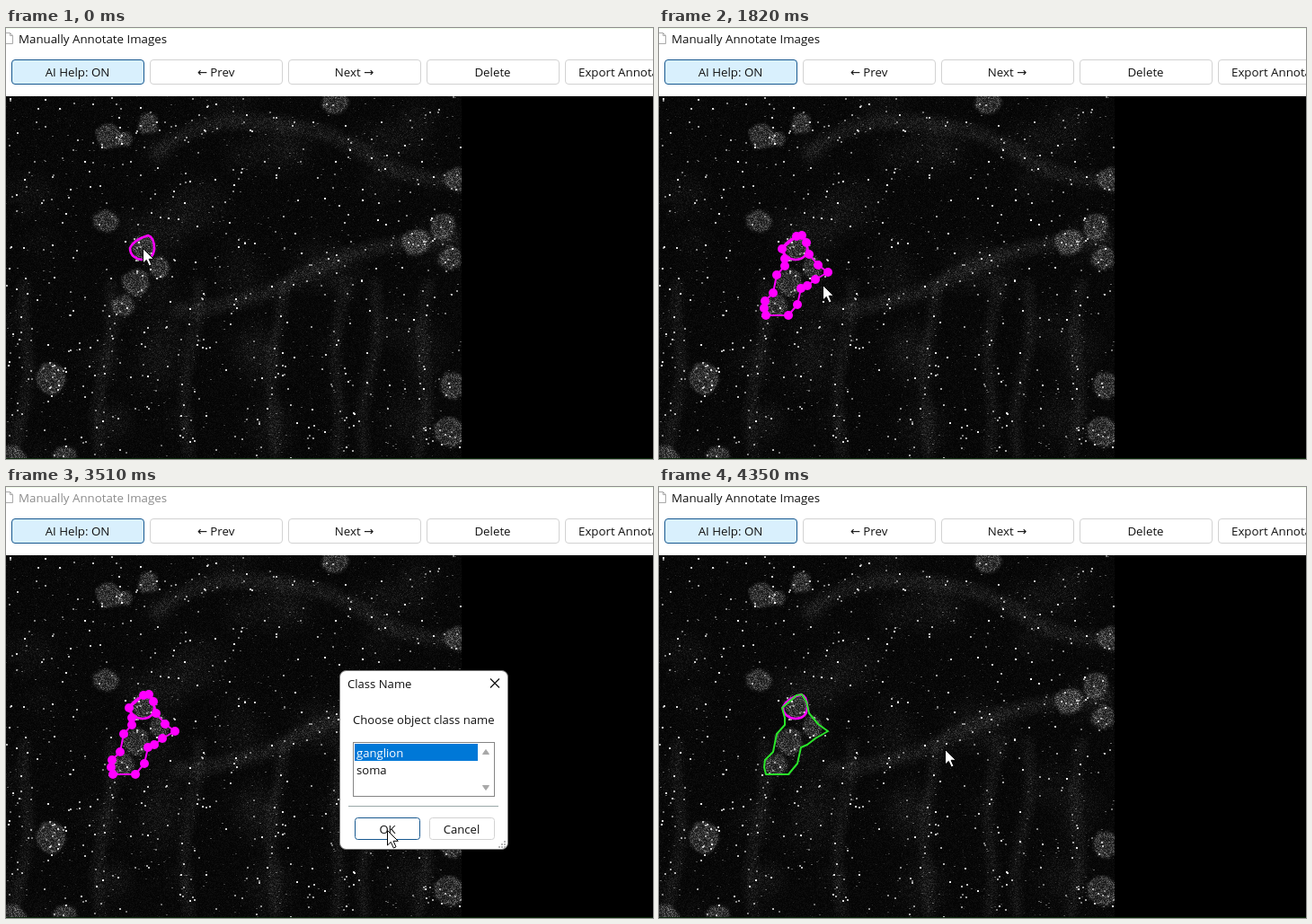
An HTML page with a canvas that plays this animation: 720 by 480 pixels, repeating every 4.75 s.

```html
<!DOCTYPE html>
<html lang="en">
<head>
<meta charset="utf-8">
<title>Manually Annotate Images</title>
<style>
  html, body { margin: 0; width: 100%; height: 100%; overflow: hidden; background: #000; }
  canvas { position: absolute; left: 0; top: 76px; }
  svg { position: absolute; left: 0; top: 0; }
  text { font: 13.3px "Open Sans", "Noto Sans", "DejaVu Sans", sans-serif; fill: #111; }
  .mid { text-anchor: middle; }
  .btn { fill: #fff; stroke: #d2d2d2; }
  .on { fill: #d9f0fd; stroke: #17588f; }
  .main { stroke: #17588f; }
  .small text { font-size: 13.1px; }
  .line { fill: none; stroke: #f0f; stroke-width: 2; stroke-linejoin: round; }
</style>
</head>
<body>
<canvas id="scan" width="507" height="404"></canvas>
<svg width="720" height="480" viewBox="0 0 720 480">
  <path fill="#fff" d="M0 0H720V76H0z"/>
  <path fill="#eefbe8" d="M0 0H720V1H0z"/>
  <path fill="#0a2a0a" d="M0 479H720V480H0z"/>
  <path fill="#fff" stroke="#aaa" d="M-4 5.500H4.500L7.500 8.500V17.500H-4M4.500 5.500V8.500H7.500"/>
  <text id="title" x="14" y="17">Manually Annotate Images</text>
  <g id="bar"></g>

  <path id="nucleus" class="line" style="stroke-width:2.600"/>
  <path id="dense" class="line" stroke-linecap="round" stroke-dasharray="0 4" style="stroke-width:9.500"/>
  <path id="outline" class="line"/>
  <g id="dots" fill="#f0f"></g>

  <g id="dialog" class="small">
    <rect x="371.500" y="204.500" width="187" height="199" rx="7" fill="#fff" stroke="#777"/>
    <text x="380" y="224">Class Name</text>
    <path stroke="#111" stroke-width="1.200" d="M539 213.500l10 10m0-10l-10 10"/>
    <text x="386" y="264">Choose object class name</text>
    <rect x="386.500" y="284.500" width="157" height="60" fill="#fff" stroke="#858585"/>
    <rect id="pick" x="388" width="137" height="19" fill="#0078d7"/>
    <text id="item0" x="390" y="301">ganglion</text>
    <text id="item1" x="390" y="320">soma</text>
    <path fill="#a8a8a8" stroke="#a8a8a8" stroke-linejoin="round" d="M530.500 297.500h7l-3.500-5zM530.500 332.500h7l-3.500 5z"/>
    <path stroke="#9aa8a8" d="M381 355.500H548"/>
    <rect class="btn main" x="388.500" y="368.500" width="72" height="24" rx="3"/>
    <rect class="btn" x="471.500" y="368.500" width="72" height="24" rx="3"/>
    <text class="mid" x="424.500" y="386">OK</text>
    <text class="mid" x="507" y="386">Cancel</text>
    <path stroke="#b5b5b5" stroke-width="2" stroke-dasharray="2 1" d="M554 395h2M551 398h5M548 401h8"/>
  </g>
  <path id="cursor" fill="#fff" stroke="#000" d="M.500 .500V17L4.300 13.400L7.300 20L10 18.800L7.100 12.300H12.300z"/>
</svg>
<script>
const LOOP = 4750, TOP = 76, W = 507, H = 404;
const $ = id => document.getElementById(id);

// Toolbar
["AI Help: ON", "← Prev", "Next →", "Delete", "Export Annotations"].forEach((label, i) => {
  const x = 6 + i * 154;
  const at = i < 4 ? `class="mid" x="${x + 73.5}"` : `x="${x + 15}"`;
  $("bar").innerHTML += `<rect class="btn ${i ? "" : "on"}" x="${x + .5}" y="35.500" width="147" height="27" rx="3.500"/>
    <text ${at} y="54">${label}</text>`;
});

// Annotations
const nucleus = "M158 231Q165 233 165 246Q164 258 151 258Q138 256 138 245Q142 236 158 231z";
const ganglion = "153,232 159,231 164,239 167,252 177,264 188,272 174,280 165,287 158,290 154,308 " +
  "144,320 119,320 117,312 118,304 127,295 131,275 140,265 140,257 137,246";
$("nucleus").setAttribute("d", nucleus);
$("dense").setAttribute("d", nucleus);
$("outline").setAttribute("d", `M${ganglion}z`);
$("dots").innerHTML = ganglion.split(" ").map(p =>
  `<circle r="5" transform="translate(${p})"/>`).join("");

// Micrograph
let seed = 7;
const rnd = () => (seed = seed * 16807 % 2147483647) / 2147483647;
const grey = a => `rgba(255,255,255,${a})`;

function drawScan() {
  const c = $("scan").getContext("2d", { willReadFrequently: true });
  c.fillStyle = "#080808";
  c.fillRect(0, 0, W, H);
  c.translate(0, -TOP);

  // cloudy haze
  c.filter = "blur(12px)";
  c.fillStyle = grey(.035);
  for (let i = 0; i < 40; i++) {
    c.beginPath();
    c.arc(rnd() * W, TOP + rnd() * H, 12 + 18 * rnd(), 0, 7);
    c.fill();
  }

  // two arching fibres, then wavering upright ones
  c.filter = "blur(5px)";
  c.strokeStyle = grey(.075);
  c.lineWidth = 15;
  c.stroke(new Path2D("M165 145Q200 100 280 105T400 140T505 170"));
  c.stroke(new Path2D("M185 315Q270 310 320 280Q400 235 505 235"));
  c.lineWidth = 9;
  for (const x of [20, 110, 205, 300, 370, 405, 465]) {
    c.beginPath();
    for (let y = 280; y <= 480; y += 10) c.lineTo(x + 5 * Math.sin(y / 30 + x) - (y - 380) * .06, y);
    c.stroke();
  }

  // cell bodies: x, y, radius
  c.filter = "blur(1.500px)";
  c.lineWidth = 4;
  for (const [x, y, r] of [[115, 121, 13], [133, 124, 7], [158, 107, 10], [111, 215, 12], [366, 82, 13],
    [502, 168, 12], [486, 220, 13], [456, 238, 14], [494, 257, 12], [152, 245, 12], [171, 268, 11],
    [145, 284, 14], [131, 310, 11], [50, 391, 17], [497, 398, 15], [494, 450, 15], [66, 479, 12], [8, 479, 13]]) {
    c.beginPath();
    for (let a = 0; a < 6.2; a += .7) {
      const d = r * (.85 + .3 * rnd());
      c.lineTo(x + d * Math.cos(a), y + d * Math.sin(a));
    }
    c.closePath();
    c.fillStyle = grey(.16);
    c.strokeStyle = grey(.1);
    c.fill();
    c.stroke();
  }
  c.filter = "none";

  // grain
  const img = c.getImageData(0, 0, W, H), d = img.data;
  const light = d.filter((v, i) => i % 4 == 0);
  light.forEach((v, i) => d.fill(v * (.5 + 1.5 * rnd() ** 2), i * 4, i * 4 + 3));
  c.putImageData(img, 0, 0);

  // bright specks, denser where tissue glows
  for (let i = 0; i < 6500; i++) {
    const x = rnd() * W | 0, y = rnd() * H | 0, b = rnd();
    if (rnd() > .15 + light[y * W + x] / 55) continue;
    c.fillStyle = grey(.12 + .85 * b ** 5);
    c.fillRect(x, y + TOP, b > .6 ? 2 : 1, b > .8 ? 2 : 1);
  }
}
drawScan();

// Pointer stops: arrival time, travel time, x, y
const stops = [[0, 1, 152, 245], [1400, 300, 166, 265], [1820, 200, 182, 286], [2360, 340, 422, 334],
  [2900, 240, 420, 297], [3400, 300, 424, 382], [3810, 120, 418, 382], [4350, 400, 318, 292]];

function pointer(t) {
  let x = 0, y = 0;
  for (const [end, span, px, py] of stops) {
    const u = Math.min(1, Math.max(0, 1 - (end - t) / span)), e = u * u * (3 - 2 * u);
    x += (px - x) * e;
    y += (py - y) * e;
  }
  return [Math.round(x), Math.round(y)];
}

const show = (id, on) => $(id).style.display = on ? "" : "none";

function draw() {
  const t = performance.now() % LOOP;
  const asking = t >= 2180 && t < 3690, done = t >= 3690, first = t >= 3000;
  show("dense", t >= 1100 && t < 1640);
  show("outline", t >= 1640);
  show("dots", t >= 1640 && !done);
  show("dialog", asking);
  $("outline").style.stroke = done ? "#2be52b" : "#f0f";
  $("title").style.fill = asking ? "#8c8c8c" : "#111";
  $("pick").setAttribute("y", first ? 286 : 305);
  $("item0").style.fill = first ? "#fff" : "#111";
  $("item1").style.fill = first ? "#111" : "#fff";
  $("cursor").setAttribute("transform", `translate(${pointer(t)})`);
  requestAnimationFrame(draw);
}
draw();
</script>
</body>
</html>
```
